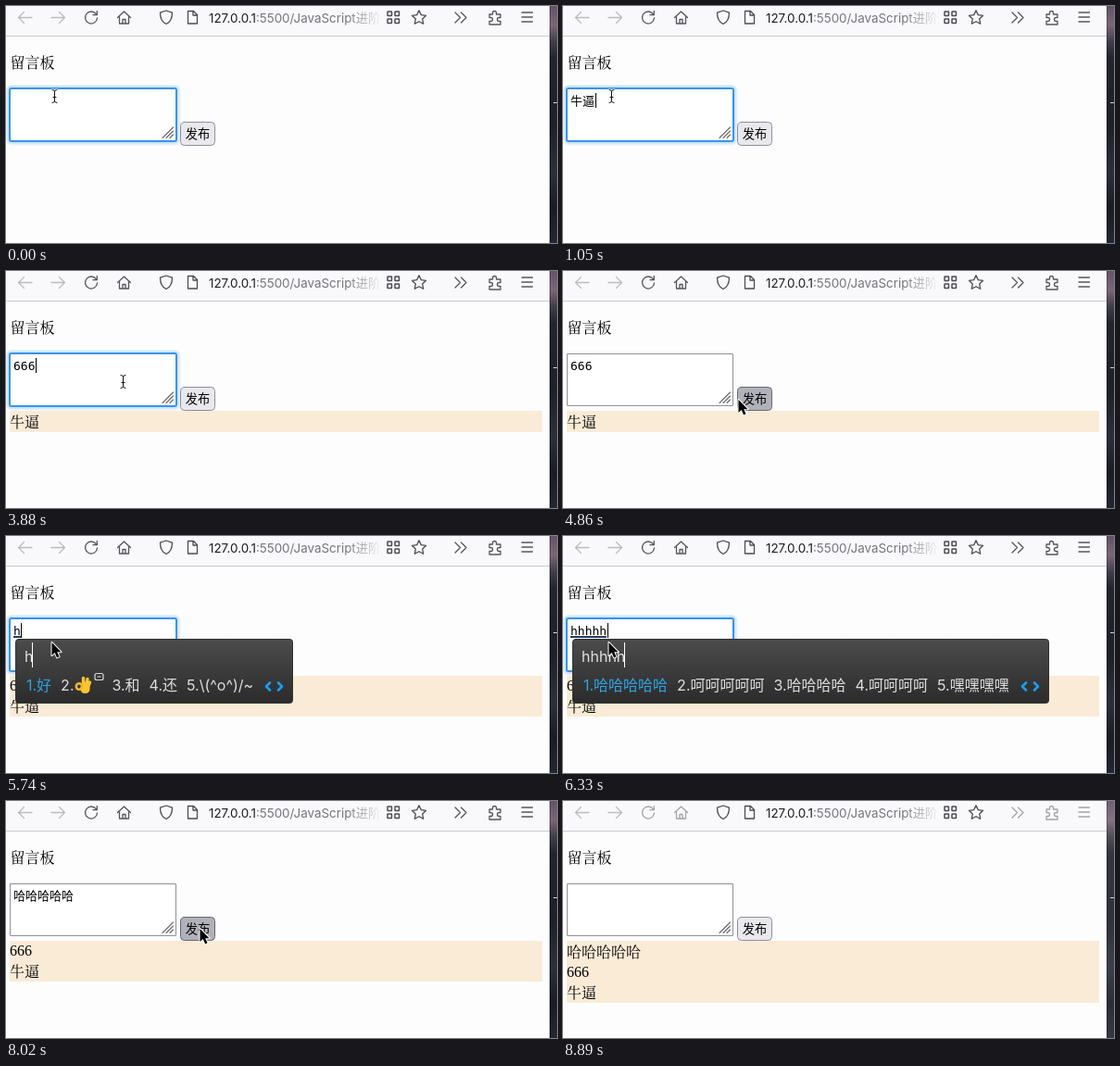
An HTML page with a canvas for the animation above (8.99 s loop, 595x256 px).

```html
<!DOCTYPE html>
<html lang="zh-CN">
<head>
<meta charset="utf-8">
<title>留言板</title>
<style>
html, body { margin: 0; width: 100%; height: 100%; overflow: hidden; background: #fdfdfd; }
canvas { display: block; }
</style>
</head>
<body>
<canvas id="stage" width="595" height="256"></canvas>
<script>
const ctx = document.getElementById('stage').getContext('2d');
const LOOP = 8990, STEP = 60, INACTIVE_AT = 8890;

const CJK = '"Noto Sans CJK SC", "Noto Sans CJK"';
const SERIF = `500 16px "Liberation Serif", "Noto Serif CJK SC", ${CJK}, serif`;
const MONO = `500 13px "DejaVu Sans Mono", ${CJK}, monospace`;
const UI = `16px Inter, ${CJK}, sans-serif`;
const URL_FONT = `13.4px Inter, ${CJK}, sans-serif`;
const BUTTON_FONT = `500 13.3px ${CJK}, sans-serif`;

// time, committed text, pinyin being composed, candidates
const typing = [
  [0, ''],
  [350, '', 'n'],
  [410, '', 'n', '你 那 年 呢 能'],
  [500, '', 'ni', '你 尼 泥 拟 逆'],
  [590, '', 'niu', '牛 扭 纽 钮 妞'],
  [830, '', 'niu b', '牛逼 牛逼了 牛逼啊 牛逼吧 牛逼哄哄'],
  [930, '', 'niu bi', '牛逼 牛逼了 牛逼啊 牛鼻子 牛逼哄哄'],
  [1050, '牛逼'],
  [2220, ''],
  [3580, '6'],
  [3730, '66'],
  [3880, '666'],
  [4870, ''],
  [5680, '', 'h'],
  [5740, '', 'h', '好 👌 和 还 \\(^o^)/~'],
  [5860, '', 'hh', '哈哈 呵呵 嘿嘿 还好 很好'],
  [6040, '', 'hhh', '哈哈哈 呵呵呵 嘿嘿嘿 好好好 很好哈'],
  [6140, '', 'hhhh', '哈哈哈哈 呵呵呵呵 嘿嘿嘿嘿 好好好好 哈哈哈'],
  [6240, '', 'hhhhh', '哈哈哈哈哈 呵呵呵呵呵 哈哈哈哈 呵呵呵呵 嘿嘿嘿嘿'],
  [6440, '哈哈哈哈哈'],
  [8030, '']
];

const posts = [[2220, '牛逼'], [4870, '666'], [8030, '哈哈哈哈哈']];
const presses = [[2070, 2220], [4750, 4870], [7910, 8030]];
const focused = [[0, 2070], [2560, 4750], [5270, 7910]];
const caretOff = [[0, 350], [1470, 1970], [3100, 3580], [6800, 7300], [7800, 7910]];

// time, x, y of the pointer
const path = [
  [0, 52, 97], [1590, 52, 97], [1650, 86, 134], [1770, 86, 134],
  [1950, 204, 142], [2220, 204, 142], [2500, 126, 119], [3930, 126, 119],
  [4450, 190, 135], [4570, 190, 139], [4990, 190, 139], [5210, 50, 115],
  [7040, 50, 115], [7210, 96, 131], [7560, 208, 123], [7670, 208, 123],
  [7790, 210, 138], [8180, 210, 138], [8540, 300, 262]
];

const during = (spans, t) => spans.some(([a, b]) => t >= a && t < b);
const latest = (rows, t) => rows.filter(r => r[0] <= t).pop();
const inside = (p, x, y, r, b) => p.x >= x && p.x <= r && p.y >= y && p.y <= b;

function pointerAt(t) {
  const i = path.findIndex(p => p[0] > t);
  if (i < 0) return { x: path[path.length - 1][1], y: path[path.length - 1][2] };
  const [t0, x0, y0] = path[i - 1], [t1, x1, y1] = path[i];
  const u = Math.floor((t - t0) / STEP) * STEP / (t1 - t0);
  return { x: Math.round(x0 + (x1 - x0) * u), y: Math.round(y0 + (y1 - y0) * u) };
}

function rect(x, y, w, h, color) {
  ctx.fillStyle = color;
  ctx.fillRect(x, y, w, h);
}

function box(x, y, w, h, r, fill, line, width = 1) {
  ctx.beginPath();
  ctx.roundRect(x, y, w, h, r);
  if (fill) { ctx.fillStyle = fill; ctx.fill(); }
  if (line) { ctx.strokeStyle = line; ctx.lineWidth = width; ctx.stroke(); }
}

function text(s, x, y, font, color) {
  ctx.font = font;
  ctx.fillStyle = color;
  ctx.fillText(s, x, y);
  return ctx.measureText(s).width;
}

function icon(d, color, width = 1.3) {
  ctx.strokeStyle = color;
  ctx.lineWidth = width;
  ctx.stroke(new Path2D(d));
}

function gradient(x0, y0, x1, y1, stops) {
  const g = ctx.createLinearGradient(x0, y0, x1, y1);
  stops.forEach(([at, color]) => g.addColorStop(at, color));
  return g;
}

function drawStar(cx, cy, color) {
  ctx.beginPath();
  for (let i = 0; i < 10; i++) {
    const a = -Math.PI / 2 + i * Math.PI / 5, r = i % 2 ? 3.9 : 8;
    ctx.lineTo(cx + r * Math.cos(a), cy + r * Math.sin(a));
  }
  ctx.closePath();
  ctx.strokeStyle = color;
  ctx.lineWidth = 1.3;
  ctx.stroke();
}

function drawToolbar(active) {
  const pale = '#bcbcc0', dark = '#4b4b54', tool = active ? '#55555e' : '#a2a2a8';
  rect(0, 0, 587, 32, '#f9f9fb');
  rect(0, 32, 587, 1, '#cbcbd0');
  ctx.lineCap = ctx.lineJoin = 'round';
  icon('M28 12.5H13.5M19.5 6.5l-6 6 6 6', pale);
  icon('M49 12.5h14.5M57.5 6.5l6 6-6 6', pale);
  icon('M97.5 9A6.5 6.5 0 1 0 98.5 13M98.3 5.5V9.7H94', tool);
  icon('M120.5 12.5L127.5 6l7 6.5M122.5 11.5V19h10v-7.5M126 19v-4.5h3V19', tool);
  icon('M173 5l6.5 2.2c0 6-1.7 10-6.5 12.3-4.8-2.3-6.5-6.3-6.5-12.3z', dark);
  icon('M196.5 5.5h6l4 4v9.5h-10zM202 5.8V10h4.2', dark);

  const end = gradient(368, 0, 407, 0, [[0, '#74747c'], [1, 'rgba(116,116,124,0)']]);
  ctx.save();
  ctx.beginPath();
  ctx.rect(210, 0, 195, 32);
  ctx.clip();
  const w = text('127.0.0.1', 219, 18, URL_FONT, '#1c1c22');
  text(':5500/JavaScript进阶', 219 + w, 18, URL_FONT, end);
  ctx.restore();

  for (const [x, y] of [[412, 6], [420, 6], [412, 14], [420, 14]]) {
    box(x, y, 4.5, 4.5, 0.5, null, dark, 1.5);
  }
  drawStar(446, 12.8, dark);
  icon('M485 7l5.5 5.5-5.5 5.5M491.5 7l5.5 5.5-5.5 5.5', tool);
  icon('M522 9h3.5V7.5a2 2 0 0 1 4 0V9H534v3.5h-1.5a2 2 0 0 0 0 4H534V20H522v-3.5h1.5a2 2 0 0 0 0-4H522z', tool);
  icon('M557 7h11.5M557 12h11.5M557 17h11.5', tool);
}

function drawDesktop(active) {
  rect(587, 0, 8, 256, gradient(0, 0, 0, 256, [
    [0, '#62536a'], [0.08, '#7b6678'], [0.15, '#403e4c'], [0.22, '#22252f'],
    [0.5, '#1c2029'], [0.7, '#2b303c'], [0.85, '#191c25'], [1, '#222733']
  ]));
  rect(591, 104, 4, 1, '#d5d5da');
  if (!active) rect(587, 0, 8, 256, 'rgba(255,255,255,.08)');
  rect(587, 0, 1, 256, 'rgba(0,0,0,.25)');
}

function drawTextarea(t, value, pinyin = '') {
  const focus = during(focused, t);
  if (focus) {
    box(0, 85, 188.5, 65.5, 6, '#e6f3fc');
    box(1, 86, 186, 63, 5, '#cce7fa');
    box(4, 89, 180, 57, 2, '#fff', '#3a93ec', 2);
  } else {
    box(4.5, 89.5, 179, 56, 0.5, '#fff', '#8f8f9d');
  }
  icon('M169 142.5L180.5 131M173 142.5l7.5-7.5M177 142.5l3.5-3.5', '#68686e', 1.1);
  const w = text(value + pinyin, 8, 107, MONO, '#000');
  if (pinyin) rect(8, 108, Math.round(w), 2, '#1d3b5c');
  if (focus && !during(caretOff, t)) rect(8 + Math.ceil(w), 94, 1, 16, '#000');
}

function drawButton(t, pointer) {
  const hover = inside(pointer, 188, 125, 226, 151);
  const fill = during(presses, t) ? '#b1b1b9' : hover ? '#d0d0d7' : '#e9e9ed';
  box(188.5, 125.5, 37, 25, 4, fill, hover ? '#676774' : '#8f8f9d');
  text('发布', 193.7, 143, BUTTON_FONT, '#000');
}

function drawPosts(t) {
  let y = 151;
  for (const [, s] of posts.filter(p => p[0] <= t).reverse()) {
    const latin = /^\d+$/.test(s), h = latin ? 21 : 23;
    rect(4, y, 575, h, '#faebd7');
    text(s, 4, y + (latin ? 16 : 18), SERIF, '#000');
    y += h;
  }
}

// Hand emoji followed by its small badge
function drawHand(x, y) {
  const skin = '#fcc62f';
  icon(`M${x + 9} ${y - 7}l0-6.5M${x + 12} ${y - 6}l1.5-6.5M${x + 14} ${y - 4}l2-5`, skin, 3.4);
  box(x + 6, y - 8, 10, 11, 4.5, skin);
  ctx.beginPath();
  ctx.arc(x + 4.5, y - 4.5, 3.2, 0, Math.PI * 2);
  ctx.strokeStyle = '#f5b527';
  ctx.lineWidth = 2.6;
  ctx.stroke();
  box(x + 21.5, y - 18.5, 9, 7, 2, null, '#ddd', 1.2);
  rect(x + 24, y - 15.5, 4, 1, '#ddd');
}

function layCandidates(words, draw) {
  let x = 22;
  words.forEach((word, i) => {
    const hand = word === '👌', label = `${i + 1}.${hand ? '' : word}`;
    ctx.font = UI;
    const w = ctx.measureText(label).width;
    if (draw) {
      text(label, x, 167, UI, i ? '#dedede' : '#2ba6e6');
      if (hand) drawHand(x + w + 1, 167);
    }
    x += w + (hand ? 31 : 0) + 10;
  });
  return Math.round(x);
}

function drawPopup(pinyin, list) {
  const words = list.split(' ');
  const right = layCandidates(words, false) + 33;
  box(10.5, 111.5, right - 11, 69, 3,
    gradient(0, 111, 0, 181, [[0, '#4c4c4c'], [1, '#2b2b2b']]), '#303030');
  const w = text(pinyin, 20, 136, UI, '#e2e2e2');
  rect(20 + Math.round(w) - 1, 115, 1, 27, '#fff');
  layCandidates(words, true);
  icon(`M${right - 25} 158.5l-4 4 4 4M${right - 16} 158.5l4 4-4 4`, '#19a0f0', 2.6);
  return right;
}

function drawPointer({ x, y }, popupRight) {
  const overPopup = popupRight && inside({ x, y }, 10, 111, popupRight, 181);
  ctx.save();
  if (!overPopup && inside({ x, y }, 4, 89, 184, 146)) {
    ctx.translate(x + 0.5, y + 0.5);
    const beam = 'M-2.5-7q2.5 0 2.5 2q0-2 2.5-2M0-5V5M-2.5 7q2.5 0 2.5-2q0 2 2.5 2M-1.5 1h3';
    icon(beam, 'rgba(255,255,255,.8)', 2.6);
    icon(beam, '#111', 1);
  } else {
    ctx.translate(x - 0.5, y);
    const arrow = 'M0 0V14L3.2 11 5.6 16.4 8 15.3 5.7 10.2H10Z';
    icon(arrow, '#fff', 2);
    ctx.fillStyle = '#000';
    ctx.fill(new Path2D(arrow));
  }
  ctx.restore();
}

function render(t) {
  const active = t < INACTIVE_AT;
  const [, value, pinyin, list] = latest(typing, t);
  const pointer = pointerAt(t);
  rect(0, 0, 595, 256, '#fdfdfd');
  drawToolbar(active);
  text('留言板', 4.5, 66.5, SERIF, '#000');
  drawPosts(t);
  drawTextarea(t, value, pinyin);
  drawButton(t, pointer);
  const popupRight = list && drawPopup(pinyin, list);
  drawPointer(pointer, popupRight);
  drawDesktop(active);
}

const start = performance.now();
function tick() {
  render((performance.now() - start) % LOOP);
  requestAnimationFrame(tick);
}
tick();
</script>
</body>
</html>
```
